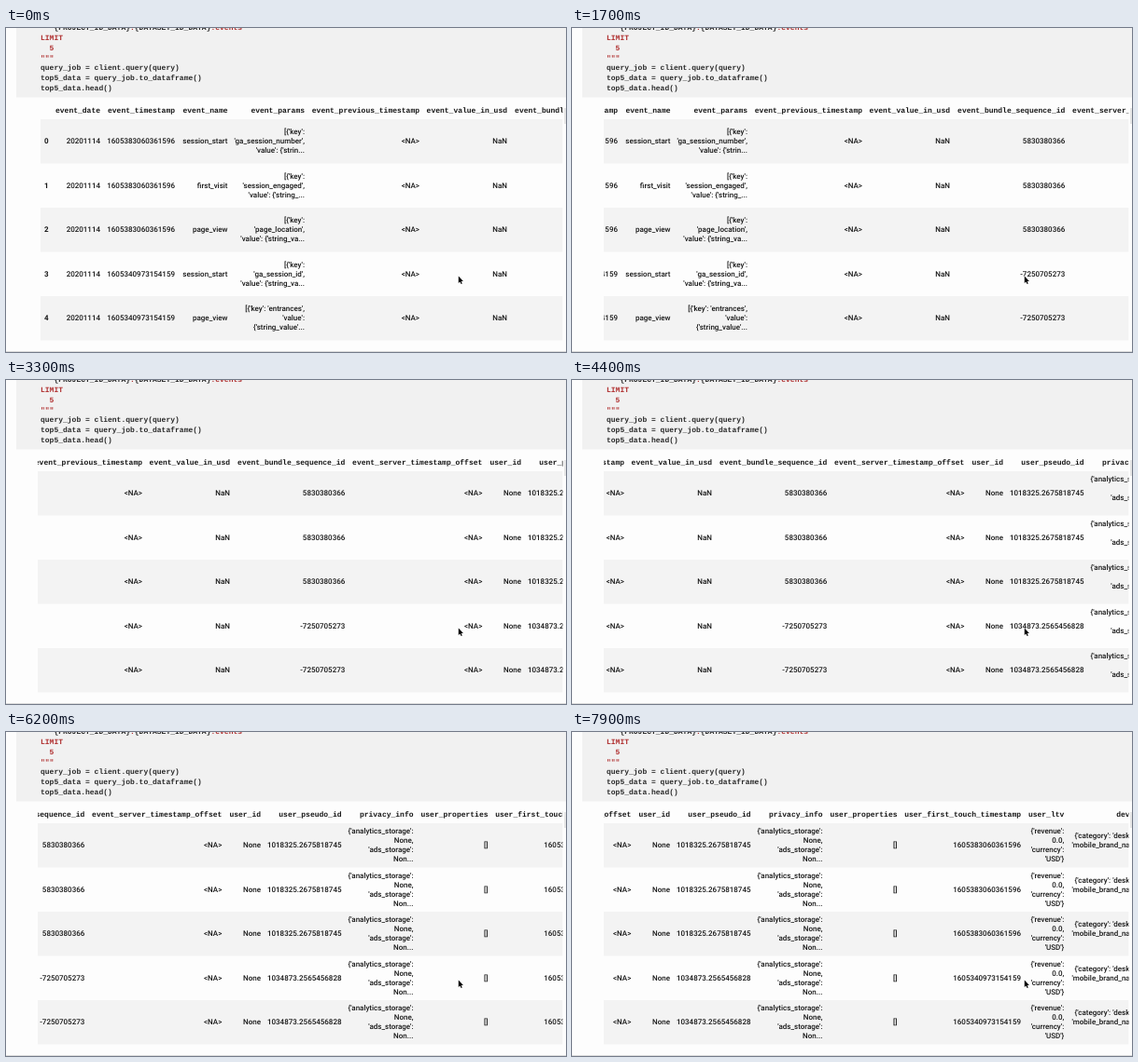
Animation, 600 px wide and 348 px high, one loop 8000 ms. Source, as an HTML page with a canvas:

```html
<!DOCTYPE html>
<html lang="en">
<head>
<meta charset="utf-8">
<title>Scrolling data frame</title>
<style>
  html, body { margin: 0; width: 100%; height: 100%; overflow: hidden; background: #fdfdfd; }
  canvas { display: block; width: 600px; height: 348px; }
</style>
</head>
<body>
<canvas id="stage"></canvas>
<script>
const W = 600, H = 348, LOOP = 8000, STEP = 100;
const canvas = document.getElementById('stage');
const ctx = canvas.getContext('2d');
const dpr = window.devicePixelRatio || 1;
canvas.width = W * dpr;
canvas.height = H * dpr;
ctx.scale(dpr, dpr);
ctx.textRendering = 'geometricPrecision';

const MONO = 'bold 8px "Liberation Mono", monospace';
const SANS = '8px Roboto, sans-serif';
const INK = '#161616', CODE = '#2a2a2a', RED = '#b03030';
const VIEW = { left: 34, right: 596.5 };
const ROWS = 5, ROW_TOP = 98, ROW_H = 47.5, LINE_H = 10.1;

// Scroll flicks: start in ms, number of steps, position reached
const flicks = [
  [100, 4, 41], [800, 4, 82],
  [1500, 4, 134], [1900, 5, 190],
  [2400, 6, 250], [3100, 4, 299], [3800, 4, 346],
  [4300, 4, 403.5], [4900, 4, 463], [5400, 4, 528.9],
  [5900, 5, 577], [6400, 4, 622], [6800, 2, 641],
  [7200, 4, 694], [7600, 4, 744]
];

const all = value => Array(ROWS).fill(value);
const split = (a, b) => [a, a, a, b, b];
const stamps = split('1605383060361596', '1605340973154159');

// Column name, right edge, cells
const columns = [
  ['event_date', 101, all('20201114')],
  ['event_timestamp', 181, stamps],
  ['event_name', 237.5, ['session_start', 'first_visit', 'page_view', 'session_start', 'page_view']],
  ['event_params', 320, [
    "[{'key':\n'ga_session_number',\n'value': {'strin...",
    "[{'key':\n'session_engaged',\n'value': {'string_...",
    "[{'key':\n'page_location',\n'value': {'string_va...",
    "[{'key':\n'ga_session_id',\n'value': {'string_va...",
    "[{'key': 'entrances',\n'value':\n{'string_value'..."
  ]],
  ['event_previous_timestamp', 443, all('<NA>')],
  ['event_value_in_usd', 537, all('NaN')],
  ['event_bundle_sequence_id', 660.3, split('5830380366', '-7250705273')],
  ['event_server_timestamp_offset', 807.3, all('<NA>')],
  ['user_id', 849, all('None')],
  ['user_pseudo_id', 935.5, split('1018325.2675818745', '1034873.2565456828')],
  ['privacy_info', 1012.5, all("{'analytics_storage':\nNone,\n'ads_storage':\nNon...")],
  ['user_properties', 1092.5, all('[]')],
  ['user_first_touch_timestamp', 1225, stamps],
  ['user_ltv', 1271.3, all("{'revenue':\n0.0,\n'currency':\n'USD'}")],
  ['device', 1356, all("{'category': 'desktop',\n'mobile_brand_name',\n'...")]
];

function ease(x) {
  const u = 1 - Math.pow(1 - x, 1.5);
  return u * u * (3 - 2 * u);
}

function scrollAt(time) {
  let pos = 0;
  for (const [start, steps, end] of flicks) {
    if (time < start) break;
    const done = Math.min(1, ((time - start) / STEP + 1) / steps);
    pos += (end - pos) * ease(done);
  }
  return Math.round(pos);
}

function rect(x, y, w, h, color) {
  ctx.fillStyle = color;
  ctx.fillRect(x, y, w, h);
}

function text(str, x, y, font, color = INK, align = 'left') {
  ctx.font = font;
  ctx.fillStyle = color;
  ctx.textAlign = align;
  ctx.fillText(str, x, y);
}

function drawCode() {
  rect(11, 0, W - 11, 74.5, '#f1f1f1');
  let x = 46.6;
  const path = [['`', RED], ['{PROJECT_ID_DATA}', CODE], ['.', RED],
                ['{DATASET_ID_DATA}', CODE], ['.events`', RED]];
  for (const [part, color] of path) {
    text(part, x, 2.3, MONO, color);
    x += ctx.measureText(part).width;
  }
  const lines = [['LIMIT', RED], ['  5', RED], ['"""', RED],
                 ['query_job = client.query(query)', CODE],
                 ['top5_data = query_job.to_dataframe()', CODE],
                 ['top5_data.head()', CODE]];
  lines.forEach(([line, color], i) => text(line, 37, 12.8 + i * 10.85, MONO, color));
}

function drawCell(cell, right, mid) {
  const lines = cell.split('\n');
  const top = mid + 2.8 - (lines.length - 1) * LINE_H / 2;
  lines.forEach((line, i) => text(line, right, top + i * LINE_H, '500 ' + SANS, INK, 'right'));
}

function drawTable(scroll) {
  ctx.save();
  ctx.beginPath();
  ctx.rect(VIEW.left, 76, VIEW.right - VIEW.left, 262);
  ctx.clip();
  const left = Math.max(VIEW.left, 37 - scroll);
  for (let r = 0; r < ROWS; r++) {
    const top = ROW_TOP + r * ROW_H;
    if (r % 2 === 0) rect(left, top, VIEW.right - left, ROW_H, '#f3f3f3');
    text(String(r), 45.5 - scroll, top + 26.3, 'bold ' + SANS, INK, 'right');
  }
  for (const [name, edge, cells] of columns) {
    const right = edge - scroll;
    if (right < VIEW.left || right > VIEW.right + 150) continue;
    text(name, right, 91, MONO, INK, 'right');
    cells.forEach((cell, r) => drawCell(cell, right, ROW_TOP + (r + 0.5) * ROW_H - 0.25));
  }
  ctx.restore();
}

function drawPointer() {
  const shape = [[0, 0], [0, 7.4], [1.7, 5.9], [2.8, 8.5], [4, 8], [2.9, 5.5], [5.1, 5.4]];
  ctx.beginPath();
  shape.forEach(([x, y]) => ctx.lineTo(484.8 + x, 266.5 + y));
  ctx.closePath();
  ctx.lineWidth = 1;
  ctx.strokeStyle = '#fff';
  ctx.stroke();
  ctx.fillStyle = '#000';
  ctx.fill();
}

function draw(time) {
  rect(0, 0, W, H, '#fdfdfd');
  drawCode();
  drawTable(scrollAt(time));
  rect(598, 86, 2, 17, '#e6e6e6');
  rect(0, 347, W, 1, '#dcdcdc');
  drawPointer();
}

const begin = performance.now();
function tick() {
  const time = (performance.now() - begin) % LOOP;
  draw(Math.floor(time / STEP) * STEP);
  requestAnimationFrame(tick);
}
tick();
</script>
</body>
</html>
```
